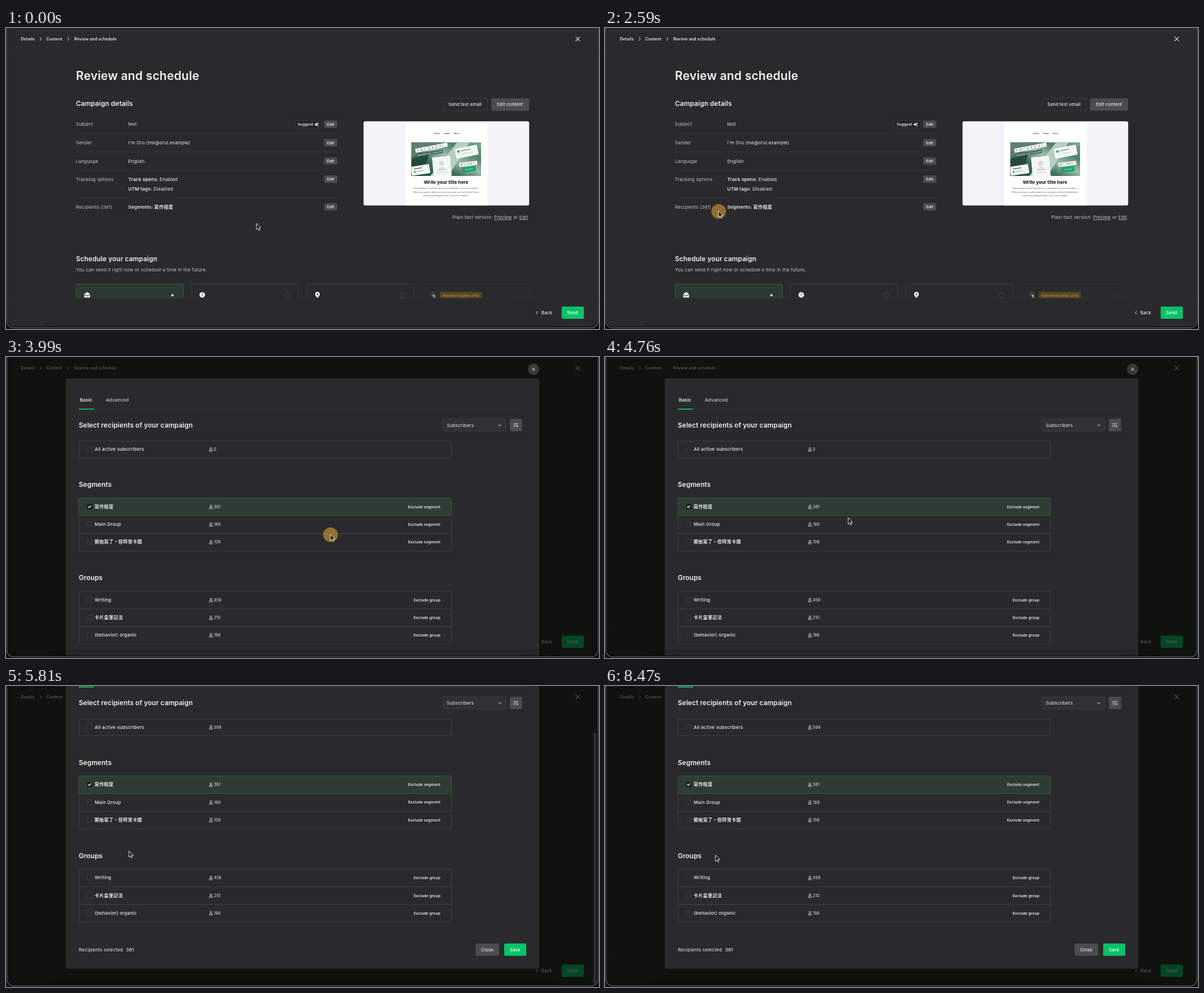
Write an HTML page that moves like this. It is 1051 px wide and 533 px high and loops after 8820 ms.

```html
<!DOCTYPE html>
<html lang="zh-Hant-TW">
<head>
<meta charset="utf-8">
<title>Review and schedule</title>
<style>
html, body { margin: 0; width: 100%; height: 100%; overflow: hidden; background: #0d0d0e; }
svg { display: block; width: 1051px; height: 533px; }
text { font-family: Inter, "Noto Sans CJK TC", "Noto Sans CJK", sans-serif; white-space: pre; }
</style>
</head>
<body>
<svg id="stage" viewBox="0 0 1051 533">
  <defs>
    <clipPath id="win"><path d="M3 0H1048V519a10 10 0 0 1-10 10H13a10 10 0 0 1-10-10Z"/></clipPath>
    <clipPath id="body"><rect x="3" y="38" width="1045" height="440.5"/></clipPath>
    <clipPath id="shot"><rect x="718.5" y="202.5" width="123.5" height="59.5"/></clipPath>
    <clipPath id="thumb"><rect x="633.7" y="165.2" width="293.5" height="149" rx="3"/></clipPath>
    <linearGradient id="leaf" x1="0" y1="1" x2="1" y2="0">
      <stop offset="0" stop-color="#2a5142"/><stop offset=".35" stop-color="#3f6d5a"/>
      <stop offset=".55" stop-color="#9dbcad"/><stop offset=".75" stop-color="#4b8169"/>
      <stop offset="1" stop-color="#7fae97"/>
    </linearGradient>
  </defs>
  <path d="M1.5 -2V519a12 12 0 0 0 12 12H1037.500a12 12 0 0 0 12-12V-2" fill="none" stroke="#59595b" stroke-width="1.500"/>
  <g clip-path="url(#win)">
    <rect width="1051" height="533" fill="#2a2a2c"/>
    <g id="page"></g>
    <g id="layer">
      <rect width="1051" height="533" fill="rgb(1,5,0)" fill-opacity=".65"/>
      <g id="modal"></g>
      <rect id="bar" x="1041" width="5" height="446" rx="2.500" fill="#646466"/>
    </g>
    <path d="M64 529Q76 518 96 518H956Q976 518 988 529Z" fill="#000" opacity=".1"/>
  </g>
  <circle id="ripple" fill="rgb(245,180,50)"/>
  <path id="cursor" d="M0 0V11L2.600 8.700 4.300 12.400 6 11.600 4.400 8H7.800Z" fill="#111" stroke="#fff" stroke-width=".9" stroke-linejoin="round"/>
</svg>
<script>
const $ = id => document.getElementById(id);
const LOOP = 8820, STEP = 70;
const XS = 7, SM = 8.05, XL = 11.8, H1 = 21;
const LIGHT = '#ececed', SOFT = '#c6c6c8', EDGE = '#414143', FILL = '#4c4c4f', GREEN = '#09c269';

// Small markup helpers; text is placed by its vertical centre.
const text = (x, y, s, size = SM, weight = 400, fill = LIGHT, track = size * .027) =>
  `<text x="${x}" y="${(y + size * .364).toFixed(2)}" font-size="${size}" font-weight="${weight}" fill="${fill}" letter-spacing="${track.toFixed(3)}">${s}</text>`;
const head = (x, y, s, size = XL) => text(x, y, s, size, 600, '#f1f1f2', size * .01);
const label = (x, y, s, fill = LIGHT) => text(x, y, s, 7.66, 500, fill);
const tiny = (x, y, s, fill = LIGHT) => text(x, y, s, 6.6, 600, fill, .15);
const cjk = (x, y, s) => text(x, y, s, 8, 700, LIGHT, .42);
const box = (x, y, w, h, fill = 'none', stroke = 'none', r = 2) =>
  `<rect x="${x}" y="${y}" width="${w}" height="${h}" rx="${r}" fill="${fill}" stroke="${stroke}" stroke-width=".8"/>`;
const line = (x1, x2, y, c = '#39393b') => `<path d="M${x1} ${y}H${x2}" stroke="${c}" stroke-width=".8"/>`;
const stroke = (d, c = LIGHT, w = 1) =>
  `<path d="${d}" fill="none" stroke="${c}" stroke-width="${w}" stroke-linecap="round" stroke-linejoin="round"/>`;
const shape = (d, c = '#fff') => `<path d="${d}" fill="${c}"/>`;
const dot = (x, y, r, fill, ring = 'none') => `<circle cx="${x}" cy="${y}" r="${r}" fill="${fill}" stroke="${ring}" stroke-width=".8"/>`;
const move = (x, y, s, turn = 0) => `<g transform="translate(${x} ${y}) rotate(${turn})">${s}</g>`;
const cross = (x, y, r, w) => stroke(`M${x - r} ${y - r}l${2 * r} ${2 * r}m0 ${-2 * r}l${-2 * r} ${2 * r}`, LIGHT, w);

function header() {
  const chevron = x => stroke(`M${x - 1.2} 16.700l2.400 2.600l-2.400 2.600`);
  const crumb = (x, s) => text(x, 19, s, XS, 600);
  return line(3, 1048, 37.5, '#303032') + crumb(26.5, 'Details') + chevron(61.5) +
    crumb(71.5, 'Content') + chevron(110.5) + crumb(121, 'Review and schedule') + cross(1013.3, 19.3, 3.5, 1.1);
}

function details() {
  const bold = s => `<tspan font-weight="600">${s}</tspan>`;
  const rows = [
    [170.5, 'Subject', 'test'],
    [203.3, 'Sender', "I'm Oru (me@orul.example)"],
    [235.8, 'Language', 'English'],
    [268, 'Tracking options', bold('Track opens:') + ' Enabled'],
    [317, 'Recipients (381)', bold('Segments:')]
  ];
  let s = head(124, 84, 'Review and schedule', H1) + head(124, 134, 'Campaign details');
  for (const [y, name, value] of rows)
    s += text(124, y, name, SM, 400, SOFT) + text(216.8, y, value) +
      box(564, y - 6.7, 23, 13, FILL) + tiny(569, y, 'Edit');
  s += text(216.8, 285, bold('UTM tags:') + ' Disabled') + cjk(262.8, 316.8, '寫作程度');
  s += [187, 219.5, 252, 301].map(y => line(124, 587, y)).join('') + line(124, 927, 361.5, '#2f2f31');
  s += box(512.4, 164.3, 47, 12.8, '#242426', EDGE) + tiny(517, 170.6, 'Suggest') +
    shape('M549.500 167.500l1 2.300 2.300 1-2.300 1-1 2.300-1-2.300-2.300-1 2.300-1ZM552.800 167l.6 1.200 1.200.6-1.200.6-.6 1.200-.6-1.200-1.200-.6 1.200-.6ZM552.800 171.200l.6 1.200 1.200.6-1.200.6-.6 1.200-.6-1.200-1.200-.6 1.200-.6Z');
  s += box(774.4, 124.6, 78.6, 21.6, 'none', '#434345') + label(784, 135.4, 'Send test email') +
    box(860, 124.4, 67, 22, FILL) + label(870, 135.4, 'Edit content');
  const link = w => `<tspan text-decoration="underline">${w}</tspan>`;
  return s + text(791, 335, `Plain text version: ${link('Preview')} or ${link('Edit')}`, SM, 400, SOFT);
}

function toolbar(x, y, w, turn, glyphs) {
  return move(x, y, box(0, 0, w, 7, '#f4f7f5', 'none', 1) +
    [...glyphs].map((g, i) => text(3 + i * (w - 5) / glyphs.length, 3.5, g, 4, 600, '#34423b', 0)).join(''), turn);
}

function preview() {
  const card = (w, h, inner) => box(0, 0, w, h, '#f3f7f4', 'none', 1.5) + inner;
  const photo = `<g clip-path="url(#shot)">` +
    box(718, 202, 125, 61, 'url(#leaf)', 'none', 0) +
    shape('M718 202H778L718 229Z', '#5f7f70') + shape('M752 262L800 202H822L784 262Z', '#b7cec2') +
    shape('M718 232L750 224 738 262H718Z', '#25483a') +
    toolbar(725, 214, 58, -11, 'TBIUAS≡•') +
    move(728, 225.5, box(0, -3, 47, 6, '#3f6655', 'none', .5) + text(1, 0, 'Generate copy in seconds', 3.6, 500, '#fff', 0), -9) +
    move(755, 229, card(32, 36, dot(16, 12, 4.5, '#d6dcd8') + shape('M7 25Q16 12 25 25Z', '#d6dcd8') + box(6, 28, 20, 1, '#c5cec9')), -5) +
    move(795, 214, card(40, 18, dot(6, 6, 2.2, '#22a568') + box(10, 5, 18, 1.4, '#7f8f87') + box(5, 11, 26, 1, '#c8d1cc')), -11) +
    move(717, 246, card(33, 16, box(5, 4, 16, 1.4, '#53645b') + dot(6, 10, 1.6, '#22a568') + box(10, 9, 13, 1.2, '#aab8b0')), -9) +
    toolbar(803, 239, 32, -7, 'B•≡A•') +
    move(808, 247, box(0, 0, 24, 9, '#16a46a', 'none', 1) + text(5, 4.5, 'Click here', 3, 500, '#fff', 0), -7) + '</g>';
  const small = (x, y, s) => text(x, y, s, 3.6, 400, '#55585c', 0);
  return `<g clip-path="url(#thumb)">` + box(633, 165, 295, 150, '#f3f4f8', 'none', 0) +
    box(708, 169, 145.5, 146, '#fff', 'none', 0) +
    [[759, 'About'], [777, 'News'], [794, 'Shop']].map(([x, s]) => text(x, 186.5, s, 3.6, 500, '#333', 0)).join('') + photo +
    text(740.4, 273.5, 'Write your title here', 8.2, 700, '#111', 0) +
    small(722.5, 284, 'Start typing here and introduce your newsletter to your subscribers.') +
    small(722, 290.5, 'When you want to add a new block, just grab one from the left-hand') +
    small(739.5, 296.8, 'sidebar and drag and drop it into your template.') + '</g>';
}

function schedule() {
  let s = head(124, 409, 'Schedule your campaign') +
    text(124, 428, 'You can send it right now or schedule a time in the future.', SM, 400, SOFT) + '<g clip-path="url(#body)">';
  [124.4, 328.6, 532.8, 737].forEach((x, i) => {
    s += box(x, 453.5, 189.8, 40, i ? 'none' : '#2c3a32', ['#1f7449', EDGE, EDGE, '#343436'][i]) +
      (i ? dot(x + 170.6, 473.2, 4.6, 'none', i < 3 ? '#474749' : '#363638') : dot(295, 473.2, 2, '#fff'));
  });
  s += shape('M138.800 471l5-3.500 5 3.500v6.300h-10Z') + stroke('M139.500 472l4.300 2.800 4.300-2.800', '#2c3a32', 1.1) +
    dot(347.8, 472.6, 4.9, '#fff') + stroke('M347.800 469.800v3l1.800 1.300', '#2a2a2c') +
    shape('M552 478c-2.600-3-4.200-4.500-4.200-6.500a4.200 4.200 0 0 1 8.400 0c0 2-1.600 3.500-4.200 6.500Z') + dot(552, 471.5, 1.4, '#2a2a2c') +
    shape('M755.500 471l6.500 2.600-2.700 1 2.500 2.600-1 1-2.500-2.500-1 2.500Z', '#9a9a9c') +
    stroke('M752.200 472.800h1.400M753 468.800l1.200 1.200M756.500 467.500v1.500M760 468.500l-1 1.200', '#9a9a9c', .9) +
    box(769, 467.3, 74.5, 12, '#564623') + text(773.5, 473.2, 'Advanced plan only', 6.6, 500, '#ad8b4a');
  return s + '</g>' + line(3, 1048, 478.7, '#343436') +
    stroke('M942 501.700l-2.200 2.400 2.200 2.400') + label(949, 504.2, 'Back') +
    box(984.8, 493.2, 39.5, 21.8, GREEN) + label(994.3, 504.2, 'Send', '#fff');
}

function dialog() {
  const person = y => `<circle cx="363.200" cy="${y - 1.6}" r="1.600" fill="none" stroke="${LIGHT}" stroke-width=".8"/>` +
    stroke(`M360.400 ${y + 3}v-.6q0-1.600 1.600-1.600h2.400q1.600 0 1.600 1.600v.6Z`, LIGHT, .8);
  const row = (y, name, count, action, x, picked) =>
    box(143.8, y - 4.5, 8.8, 8.8, picked ? '#1d1f1e' : 'none', picked ? '#1d1f1e' : '#404042', 1.5) +
    (picked ? stroke(`M146 ${y}l1.600 1.700 2.800-3.300`, '#fff', 1.3) : '') +
    (name.charCodeAt(0) > 255 ? cjk(157, y, name) : text(157.3, y, name, SM, 500)) + person(y + .2) +
    text(368.3, y + .3, count, XS) + (action ? tiny(x, y + .3, action) : '');
  const frame = (y, h) => box(129.2, y, 660.3, h, 'none', '#444446');
  const seg = 'Exclude segment', grp = 'Exclude group';
  return box(106, 38, 839, 553, '#2a2a2c', 'none', 3) +
    dot(935, 21.8, 10, '#39393b') + cross(935, 21.8, 2.3, 1) +
    text(131, 76.5, 'Basic', SM, 600) + text(177, 76.5, 'Advanced', SM, 500, SOFT) +
    line(129, 921, 92.4, '#363638') + box(129, 91.4, 27, 1.8, GREEN, 'none', 0) +
    head(129, 120.5, 'Select recipients of your campaign') +
    box(774.4, 109.8, 111.6, 21.4, '#313133', EDGE) + text(781.3, 120.6, 'Subscribers') +
    stroke('M872.800 119.700l2.400 2.400 2.400-2.400') +
    box(893, 109.6, 21.6, 21.8, FILL) +
    stroke('M899.800 118h7.500M899.800 120.800h4M899.800 123.500h2.800M906.200 119.800v4M904.500 122.300l1.700 1.700 1.700-1.700', LIGHT, .9) +
    frame(148.8, 29.6) + row(163.3, 'All active subscribers', '<tspan id="total"></tspan>') +
    line(129, 789, 197.6, '#313133') + head(129, 226, 'Segments') + frame(249.8, 93.8) +
    line(129, 789.5, 312.5, '#4c4c4e') + box(129.2, 249.8, 660.3, 31.2, '#2e3c34', '#25663f') +
    row(265, '寫作程度', '381', seg, 712.7, true) + row(296.2, 'Main Group', '189', seg, 712.7) +
    row(327.4, '開始寫了\uff0c但時常卡關', '106', seg, 712.7) +
    line(129, 789.5, 363, '#303032') + head(129, 391, 'Groups') + frame(414.8, 93.6) +
    line(129, 789.5, 446, '#444446') + line(129, 789.5, 477.4, '#4c4c4e') +
    row(430, 'Writing', '458', grp, 722.4) + row(461.4, '卡片盒筆記法', '210', grp, 722.4) +
    row(492.4, '(behavior) organic', '198', grp, 722.4) +
    line(129, 921, 527.4, '#343436') + text(129, 557.5, 'Recipients selected') +
    `<g id="spin">${stroke('M217.500 553.800a3.600 3.600 0 1 0 3.600 3.600', LIGHT, 1.2)}</g>` +
    `<g id="sum">${text(213, 557.5, '381', SM, 500)}</g>` +
    box(832.5, 546.5, 41.5, 21.8, FILL) + label(842, 557.5, 'Close') +
    `<g id="save">${box(883, 546.5, 39, 21.8, GREEN) + label(893, 557.5, 'Save', '#fff')}</g>`;
}

$('page').innerHTML = header() + details() + preview() + schedule();
$('modal').innerHTML = dialog();

const pointer = [
  [1050, 444, 346], [1960, 201.3, 324], [2870, 201.3, 324], [3780, 575, 314], [4480, 575, 314],
  [4760, 431, 284.8], [5460, 431, 284.8], [5810, 218, 292], [6370, 181.3, 302.5], [7490, 181.3, 302.5], [8120, 195.7, 299.5]
];
const scroll = [[4900, 0], [4970, 22], [5040, 50.4], [5110, 68], [5180, 79], [5250, 85], [5390, 90.5]];
const barFade = [[4900, 0], [4970, 1], [5530, 1], [5950, 0]];
const pulse = [[0, 8, .55], [70, 13, .5], [140, 16.8, .22], [210, 17.4, .08], [280, 17.5, 0]];
const clicks = [2100, 2520, 3920, 6440, 6720];
const smooth = k => k * k * (3 - 2 * k);

// Values of a keyed table at time t.
function at(table, t, ease = k => k) {
  const i = table.findIndex(k => k[0] > t);
  if (i < 0) return table[table.length - 1].slice(1);
  if (i === 0) return table[0].slice(1);
  const a = table[i - 1], b = table[i], k = ease((t - a[0]) / (b[0] - a[0]));
  return a.slice(1).map((v, j) => v + (b[j + 1] - v) * k);
}

function draw(t) {
  const [x, y] = at(pointer, t, smooth), [top] = at(scroll, t);
  const loaded = t >= 5250;
  $('cursor').setAttribute('transform', `translate(${x} ${y})`);

  const start = clicks.find(c => t >= c && t < c + 280);
  const [r, alpha] = start === undefined ? [0, 0] : at(pulse, t - start);
  const ripple = $('ripple');
  ripple.setAttribute('cx', x + .2);
  ripple.setAttribute('cy', y + .7);
  ripple.setAttribute('r', r);
  ripple.setAttribute('fill-opacity', alpha);

  $('layer').setAttribute('opacity', t < 3920 ? 0 : t < 3990 ? .5 : 1);
  $('modal').setAttribute('transform', `translate(0 ${-top})`);
  $('total').textContent = loaded ? '599' : '0';
  $('spin').setAttribute('transform', `rotate(${t * .45} 217.5 557.4)`);
  $('spin').setAttribute('opacity', loaded || t < 4970 ? 0 : 1);
  $('sum').setAttribute('opacity', loaded ? 1 : 0);
  $('save').setAttribute('opacity', loaded ? 1 : .5);

  $('bar').setAttribute('y', 3 + top * .875);
  $('bar').setAttribute('opacity', at(barFade, t)[0]);
}

const begin = performance.now();
function tick(now) {
  const t = Math.max(0, now - begin) % LOOP;
  draw(Math.min(8470, Math.floor(t / STEP) * STEP));
  requestAnimationFrame(tick);
}
draw(0);
requestAnimationFrame(tick);
</script>
</body>
</html>
```
